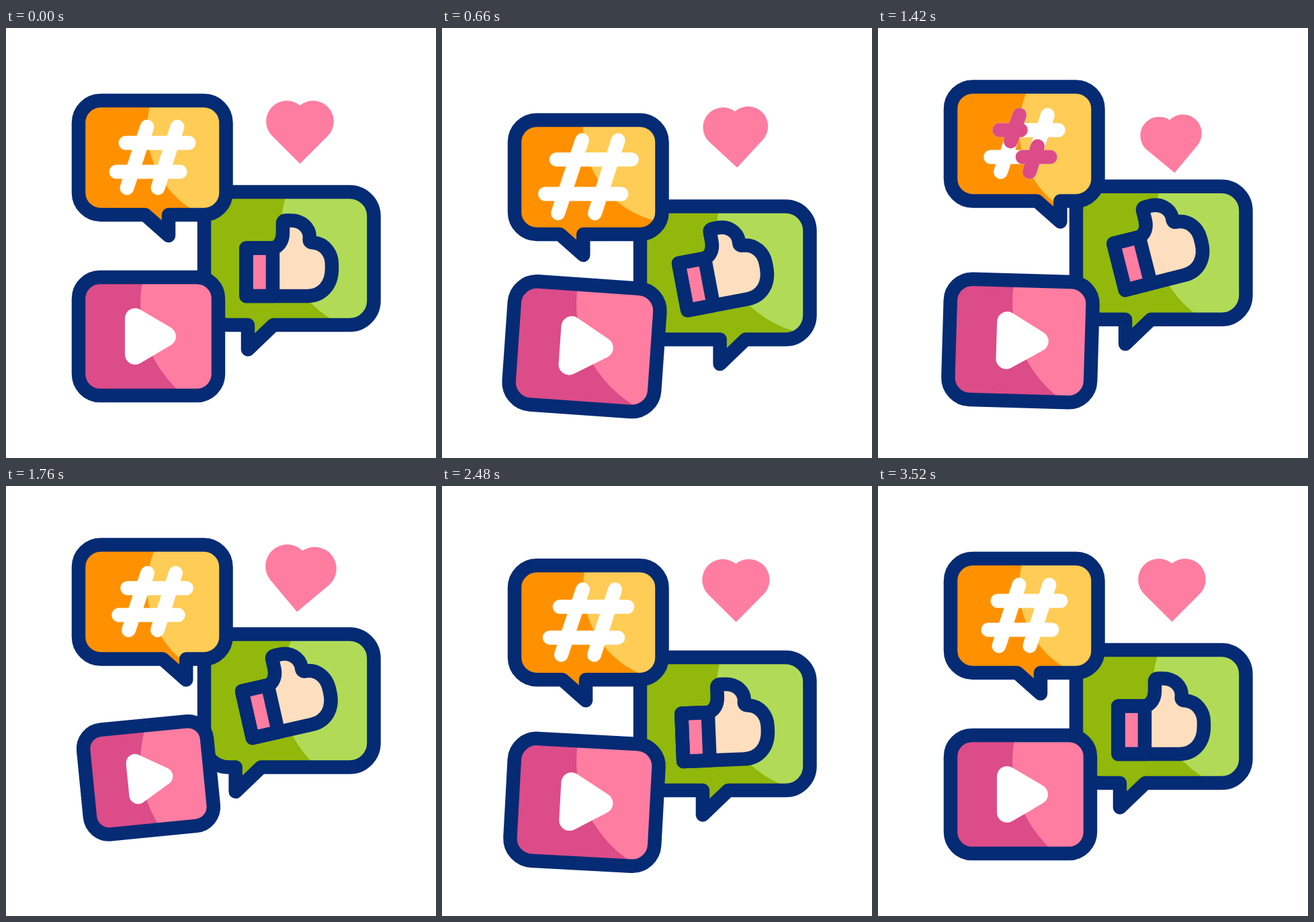
An HTML page with a canvas that plays this animation: 640x640 px, repeating every 3.6 s.

```html
<!DOCTYPE html>
<html lang="en">
<head>
<meta charset="utf-8">
<title>Social bubbles</title>
<style>
  html, body { margin: 0; width: 100%; height: 100%; overflow: hidden; background: #fff; }
  canvas { display: block; width: 640px; height: 640px; }
</style>
</head>
<body>
<canvas id="stage" width="640" height="640"></canvas>
<script>
const ctx = document.getElementById('stage').getContext('2d');
const LOOP = 3600, STEP = 785, DELAY = 135;
const NAVY = '#042b74', MAGENTA = '#dc4c88', PINK = '#ff7da1';
const LINE = 20.5;

// Every part swings 0, a, b, c, 0 in equal eased steps; each rank starts a little later
function swing(t, rank, a, b, c) {
  const stops = [0, a, b, c, 0];
  const u = Math.min(Math.max((t - rank * DELAY) / STEP, 0), 3.9999);
  const i = Math.floor(u), p = u - i;
  return stops[i] + (stops[i + 1] - stops[i]) * p * p * (3 - 2 * p);
}

// Rounded box; tail points run right to left along the bottom edge
function box(x0, y0, x1, y1, r, tail = []) {
  const p = new Path2D();
  p.moveTo(x0 + r, y0);
  p.arcTo(x1, y0, x1, y1, r);
  p.arcTo(x1, y1, x0, y1, r);
  tail.forEach(([x, y]) => p.lineTo(x, y));
  p.arcTo(x0, y1, x0, y0, r);
  p.arcTo(x0, y0, x1, y0, r);
  p.closePath();
  return p;
}

const videoBox = box(108, 371, 316, 547, 32);
const play = new Path2D('M192 432V486L238 459Z');
const heart = new Path2D('M437.5 202L396 160.6A30.8 30.8 0 0 1 437.5 115.2A30.8 30.8 0 0 1 479 160.6Z');
const hand = new Path2D('M357.5 327.5H397C406 326 412 317 412 305V291Q412 286.5 417 286.5H424' +
  'C440 286.5 452 297 452 312C451 317 452 319.5 458 319.5C474 321 485 335 485 352V358' +
  'C485 383 470 399 448 399H357.5Z');
const cuff = new Path2D('M357.5 327.5H397V399H357.5Z');
const hash = new Path2D('M178 171H272M164 214H259M210 147L180 238M255 147L226 238');
const crosses = [
  new Path2D('M226 171H272M255 147L241 192M164 214H210M195 194L180 238'),
  new Path2D('M178 171H212M210 147L196 189M215 214H259M239 197L226 238')
];

function fill(path, color) {
  ctx.fillStyle = color;
  ctx.fill(path);
}

function stroke(path, color, width) {
  ctx.strokeStyle = color;
  ctx.lineWidth = width;
  ctx.stroke(path);
}

function group(draw) {
  ctx.save();
  draw();
  ctx.restore();
}

function turn(x, y, deg, scale = 1) {
  ctx.translate(x, y);
  ctx.rotate(deg * Math.PI / 180);
  ctx.scale(scale, scale);
  ctx.translate(-x, -y);
}

// Coloured panel whose light disc stays fixed on the stage
function panel(path, dark, light, [x, y, r], width = LINE) {
  fill(path, dark);
  group(() => {
    ctx.clip(path);
    ctx.setTransform(1, 0, 0, 1, 0, 0);
    const disc = new Path2D();
    disc.arc(x, y, r, 0, Math.PI * 2);
    fill(disc, light);
  });
  stroke(path, NAVY, width);
}

function drawHeart(t) {
  const y = swing(t, 3, 30, -27.5, 12);
  ctx.translate(0, y);
  turn(437.5, 155, y * -0.3, 1 - y * (y > 0 ? 0.005 : 0.003));
  fill(heart, PINK);
}

function drawLike(t) {
  const x = swing(t, 1, 72, -19, 28);
  ctx.translate(0, swing(t, 1, 29, -24, 11));
  const path = box(295, 244, 547.5, 442, 36, [[398 + x, 442], [360 + x, 478.5], [360 + x, 442]]);
  panel(path, '#91b80a', '#b1db56', [567, 299, 158]);
  turn(360, 357, swing(t, 0, -11.5, -14.5, -2.5));
  fill(hand, '#fddfbf');
  fill(cuff, PINK);
  stroke(hand, NAVY, LINE);
  stroke(cuff, NAVY, LINE);
}

function drawVideo(t) {
  const angle = swing(t, 2, 8, -6, 4), up = angle > 0;
  const scale = 1 + angle * (up ? 0.011 : 0.02);
  ctx.translate(0, angle * (up ? 3.8 : 4.4));
  turn(212, 459, angle, scale);
  panel(videoBox, MAGENTA, PINK, [377, 410, 177], LINE / scale);
  fill(play, '#fff');
  stroke(play, '#fff', 30);
}

function drawHash(t) {
  const y = swing(t, 0, 31, -26, 11), x = swing(t, 0, -34, 36, -30);
  ctx.translate(0, y);
  const path = box(108, 108, 327.5, 278, 33, [[242 + x, 278], [242 + x, 309], [207 + x, 278]]);
  panel(path, '#ff9100', '#ffcc55', [351, 150, 141]);
  const scale = 1 + y * (y > 0 ? 0.0067 : 0.0033);
  turn(218, 193, 0, scale);
  stroke(hash, '#fff', 21 / scale);
  if (t >= 900 && t < 1580) stroke(crosses[t < 1240 ? 0 : 1], MAGENTA, 21 / scale);
}

function draw(t) {
  ctx.fillStyle = '#fff';
  ctx.fillRect(0, 0, 640, 640);
  [drawHeart, drawLike, drawVideo, drawHash].forEach(part => group(() => part(t)));
}

ctx.lineJoin = ctx.lineCap = 'round';
const start = performance.now();

function tick() {
  draw((performance.now() - start) % LOOP);
  requestAnimationFrame(tick);
}
tick();
</script>
</body>
</html>
```
